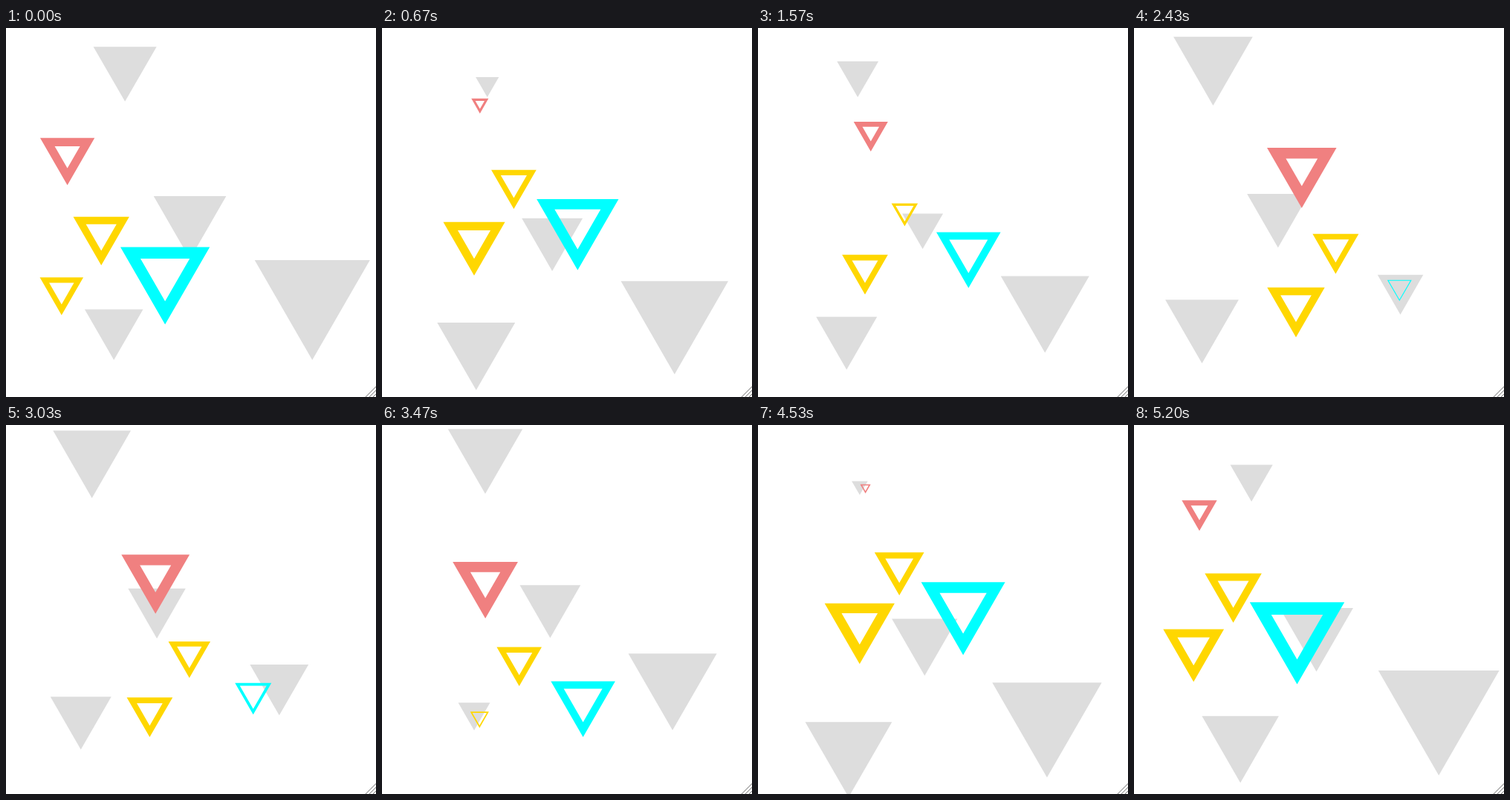
An HTML page with a canvas for the animation above (6.01 s loop, 498 by 496 pixels).

```html
<!DOCTYPE html>
<html lang="en">
<head>
<meta charset="utf-8">
<title>Parallax triangles</title>
<style>
  html, body { margin: 0; width: 100%; height: 100%; overflow: hidden; background: #fff; }
  canvas { display: block; }
</style>
</head>
<body>
<canvas id="stage" width="498" height="496"></canvas>
<script>
const ctx = document.getElementById('stage').getContext('2d');
const LOOP = 6010;
const RATE = 0.03; // ticks per ms

const triangles = [
  { x: 139, y: 82.2, r: 10.3, color: '#f08080' },
  { x: 215, y: 260, r: 23.3, color: '#ffd700' },
  { x: 126, y: 387.6, r: 22, color: '#ffd700' },
  { x: 358.2, y: 349.2, r: 35, color: '#00ffff' }
];

// Where the pointer passes, and how many ticks it rests there
const path = [
  { at: 12, x: -2, y: 299 },
  { at: 20, x: 121, y: 130.5 },
  { at: 30, x: 142, y: 102, rest: 4 },
  { at: 47, x: 171, y: 225 },
  { at: 54, x: 202, y: 256, rest: 10 },
  { at: 73, x: 356, y: 346.5 },
  { at: 84, x: 377, y: 372 },
  { at: 91, x: 294.5, y: 378.5 },
  { at: 106, x: 134, y: 401, rest: 6 },
  { at: 121, x: 150, y: 244.7 },
  { at: 132, x: 153, y: 86, rest: 12 },
  { at: 156, x: 11.5, y: 163.7 }
].flatMap(p => p.rest ? [p, { ...p, at: p.at + p.rest }] : [p]);

const lastKey = path.length - 1;

function slope(i, axis) {
  const a = path[i], b = path[i + 1];
  return (b[axis] - a[axis]) / (b.at - a.at);
}

// Monotone tangent, so the pointer never overshoots a stop
function tangent(i, axis) {
  if (i === 0) return slope(0, axis);
  if (i === lastKey) return slope(i - 1, axis);
  const a = slope(i - 1, axis), b = slope(i, axis);
  return a * b <= 0 ? 0 : 2 * a * b / (a + b);
}

function pointer(tick, axis) {
  const t = Math.min(Math.max(tick, path[0].at), path[lastKey].at);
  let i = 0;
  while (t > path[i + 1].at) i++;
  const a = path[i], b = path[i + 1];
  const span = b.at - a.at;
  const p = (t - a.at) / span, q = 1 - p;
  return a[axis] * (1 + 2 * p) * q * q + b[axis] * (1 + 2 * q) * p * p
    + span * p * q * (tangent(i, axis) * q - tangent(i + 1, axis) * p);
}

// Downward equilateral triangle in a circle of radius r
function trace(x, y, r) {
  const half = r * Math.sqrt(3) / 2;
  ctx.beginPath();
  ctx.moveTo(x - half, y - r / 2);
  ctx.lineTo(x + half, y - r / 2);
  ctx.lineTo(x, y + r);
  ctx.closePath();
}

function drawHandle() {
  ctx.strokeStyle = '#777';
  ctx.lineWidth = 1;
  ctx.beginPath();
  for (let d = 14; d > 0; d -= 5) {
    ctx.moveTo(498 - d, 496);
    ctx.lineTo(498, 496 - d);
  }
  ctx.stroke();
}

function draw(ms) {
  const tick = Math.floor((ms % LOOP + 4) * RATE);
  const mx = pointer(tick, 'x'), my = pointer(tick, 'y');

  ctx.fillStyle = '#fff';
  ctx.fillRect(0, 0, 498, 496);

  // Shadows lean away from the pointer, outlines lean towards it
  ctx.fillStyle = '#ddd';
  for (const { x, y, r } of triangles) {
    const dx = x - mx, dy = y - my;
    trace(x + 0.15 * dx, y + 0.15 * dy, r + 0.15 * Math.hypot(dx, dy));
    ctx.fill();
  }
  for (const { x, y, r, color } of triangles) {
    const dx = x - mx, dy = y - my, dist = Math.hypot(dx, dy);
    trace(x - 0.4 * dx, y - 0.4 * dy, r / 2 + 0.1 * dist);
    ctx.strokeStyle = color;
    ctx.lineWidth = 1 + 0.04 * dist;
    ctx.stroke();
  }

  drawHandle();
}

const start = performance.now();
function loop() {
  draw(performance.now() - start);
  requestAnimationFrame(loop);
}
loop();
</script>
</body>
</html>
```
